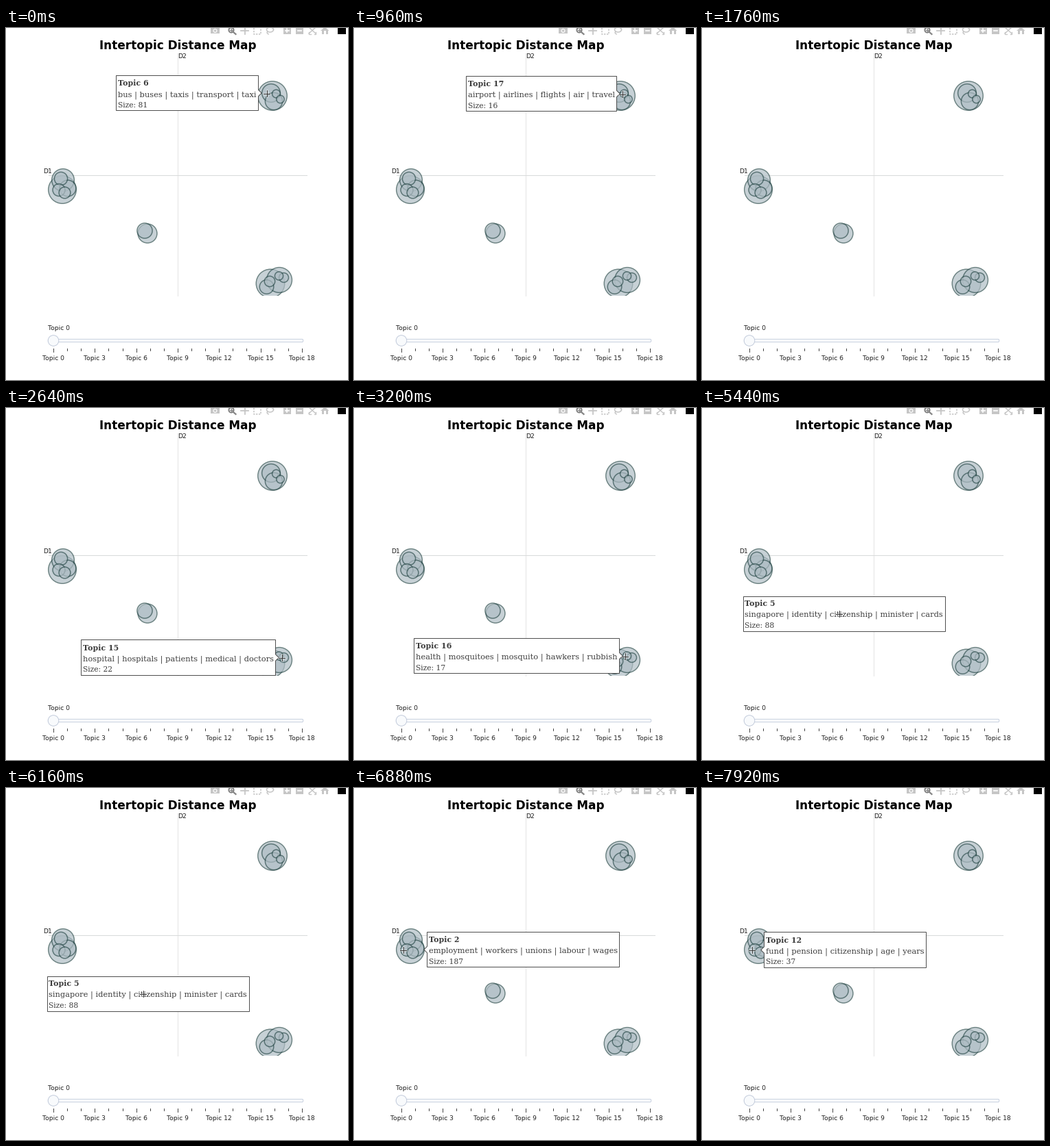
A matplotlib script for the animation above (8 s loop, 498 by 514 pixels).

```python
import matplotlib.pyplot as plt
import numpy as np
from matplotlib.animation import FuncAnimation
from matplotlib.patches import Circle, FancyBboxPatch, Polygon, Rectangle

W, H, DPI = 498, 514, 100
STEP, LOOP = 80, 8000
PT = 72 / DPI  # points per pixel
INK, LABEL = "#3c3c3c", "#1c1c1c"
ICON, ICON_ON = "#c6c6c6", "#858585"
SLIDER, SLIDER_EDGE = "#f8fafc", "#bec8d9"

# bubble centre and the topic's words, largest topic first
TOPICS = [
    (388, 99, ""),
    (385, 373, "housing | flats | tenants | buildings | estates"),
    (82, 236, "employment | workers | unions | labour | wages"),
    (398, 368, "schools | students | teachers | pupils | exam"),
    (83, 222, ""),
    (206, 300, "singapore | identity | citizenship | minister | cards"),
    (386, 95, "bus | buses | taxis | transport | taxi"),
    (390, 107, "road | traffic | vehicles | parking | cars"),
    (90, 234, ""),
    (202, 296, "language | languages | mandarin | english | chinese"),
    (379.5, 378, "culture | cultural | programmes | films | people"),
    (80, 220, ""),
    (77, 236.5, "fund | pension | citizenship | age | years"),
    (85.5, 240.5, ""),
    (384, 370, "university | students | graduates | degree | courses"),
    (404.5, 364.5, "hospital | hospitals | patients | medical | doctors"),
    (397.5, 362, "health | mosquitoes | mosquito | hawkers | rubbish"),
    (393.5, 96, "airport | airlines | flights | air | travel"),
    (399.5, 104, "ports | shipping | vessels | harbour | maritime"),
]
COUNT = len(TOPICS)
SIZES = np.interp(range(COUNT), [0, 2, 5, 6, 10, 12, 16, 18],
                  [205, 187, 88, 81, 48, 37, 17, 15]).astype(int)
CENTRES = np.array([(x, y) for x, y, _ in TOPICS])
RADII = 1.48 * np.sqrt(SIZES)

# (arrival in ms, topic) for each bubble the pointer visits
VISITS = [(0, 6), (320, 7), (960, 17), (1280, 18), (2080, 3), (2640, 15), (3040, 16),
          (3840, 14), (4240, 10), (4880, 1), (5280, 9), (5440, 5), (6400, 9),
          (6720, 2), (7520, 12)]

fig = plt.figure(figsize=(W / DPI, H / DPI), dpi=DPI, facecolor="white")
ax = fig.add_axes([0, 0, 1, 1])
ax.set(xlim=(0, W), ylim=(H, 0))
ax.axis("off")


def line(xs, ys, color, width=1.0, z=1, **kw):
    return ax.plot(xs, ys, color=color, lw=width * PT, zorder=z, **kw)[0]


def label(x, y, text, size=9.1, color=LABEL, z=3, **kw):
    kw.setdefault("family", "DejaVu Sans")
    return ax.text(x, y, text, fontsize=size * PT, color=color, zorder=z,
                   va="baseline", **kw)


def rect(x, y, w, h, color):
    return ax.add_patch(Rectangle((x, y), w, h, fc=color, lw=0))


def circle(x, y, r, fill="none", edge="none", width=0.0, **kw):
    return ax.add_patch(Circle((x, y), r, fc=fill, ec=edge, lw=width * PT, **kw))


def plus(x, y, arm, color, width):
    line([x - arm, x + arm], [y, y], color, width)
    line([x, x], [y - arm, y + arm], color, width)


def draw_toolbar():
    # camera
    rect(298, 0, 13, 8, ICON)
    circle(304.5, 4, 2.4, ICON, "white", 1.2)
    # zoom
    circle(328, 3, 3.6, edge=ICON_ON, width=2)
    line([330.5, 334.5], [5.5, 9], ICON_ON, 2.2)
    plus(328, 3, 1.8, ICON_ON, 1.2)
    # pan
    plus(347.8, 3.5, 5.5, ICON, 1.8)
    # box select and lasso
    line([361, 361, 371, 371], [0, 8.5, 8.5, 0], ICON, 1.6, ls=(0, (1.5, 1)))
    a = np.linspace(0, 2 * np.pi, 40)
    line(384.5 + 5 * np.cos(a), 2.5 + 3.5 * np.sin(a), ICON, 1.5)
    line([381, 380, 382], [5, 7, 9], ICON, 1.5)
    # zoom in and out
    for x in (404, 422):
        rect(x, 0, 10.5, 8.5, ICON)
        line([x + 2.5, x + 8], [3.5, 3.5], "white", 1.7)
    line([409.2, 409.2], [0.8, 6.2], "white", 1.7)
    # autoscale
    for side in (-1, 1):
        line([446 - 5 * side, 446 + 5 * side], [-1, 8], ICON, 1.4)
        line(446 + side * np.array([5, 5, 2.5]), [5.5, 8.5, 8.5], ICON, 1.3)
    # home
    ax.add_patch(Polygon([(458, 4), (464.3, -1.5), (470.5, 4)], fc=ICON, lw=0))
    for x in (460, 465.5):
        rect(x, 3.5, 3, 5, ICON)
    rect(483, 0, 12, 9, "black")


def draw_axes():
    label(250, 31, "Intertopic Distance Map", 16.85, "black", weight="bold", ha="center")
    line([249.5, 249.5], [37, 391], "#e4e4e4")
    line([62, 438], [214.5, 214.5], "#d8dada")
    label(250.3, 44, "D2")
    label(54.3, 212, "D1")


def draw_bubbles():
    area = Rectangle((0, 37), W, 353.5, transform=ax.transData)
    edge = 1.53
    for i, ((x, y), r) in enumerate(zip(CENTRES, RADII)):
        z = 2 + i / 100
        for patch in (circle(x, y, r - edge / 2, "#B0BEC5", alpha=0.7, zorder=z),
                      circle(x, y, r, edge="#2F4F4F", width=edge, alpha=0.7, zorder=z)):
            patch.set_clip_path(area)


def draw_slider():
    label(61.3, 441.3, "Topic 0")
    ax.add_patch(FancyBboxPatch((63, 456), 368, 1, boxstyle="round,pad=1.7",
                                fc=SLIDER, ec=SLIDER_EDGE, lw=0.8 * PT, zorder=3))
    circle(69, 456.5, 7.8, SLIDER, SLIDER_EDGE, 0.9, zorder=4)
    for i in range(COUNT):
        x, major = 69 + i * 20.1, i % 3 == 0
        line([x, x], [468, 473 if major else 471], "#333333", 0.9)
        if major:
            label(x, 485.3, f"Topic {i}", ha="center")


def pixel(v):
    return np.floor(v) + 0.5


class Tooltip:
    HALF, ARROW, PAD = 25.6, 4.7, 2.6

    def __init__(self):
        font = dict(family="DejaVu Serif", color=INK, z=11)
        self.box = ax.add_patch(Polygon([(0, 0), (1, 1), (2, 0)], fc="white", ec=INK,
                                        lw=0.9 * PT, zorder=10, joinstyle="miter"))
        self.head = label(0, 0, "", 11, weight="bold", **font)
        self.words = label(0, 0, "", 11.43, **font)
        self.size = label(0, 0, "", 10.8, **font)
        self.artists = [self.box, self.head, self.words, self.size]

    def show(self, topic, visible):
        for artist in self.artists:
            artist.set_visible(visible)
        x, y, words = TOPICS[topic]
        self.head.set_text(f"Topic {topic}")
        self.words.set_text(words)
        self.size.set_text(f"Size: {SIZES[topic]}")
        extent = self.words.get_window_extent()
        width = round(extent.width / fig.bbox.width * W + 2 * self.PAD)
        gap, a = RADII[topic] + self.ARROW, self.ARROW

        # beside the bubble where there is room, otherwise centred on it
        tip = None
        if x - gap - width > 0:
            left, tip = pixel(x - gap) - width, 1
        elif x + gap + width < 400:
            left, tip = pixel(x + gap), -1
        else:
            left = pixel(x - width / 2)
        right, top, bottom = left + width, pixel(y - self.HALF), pixel(y + self.HALF)
        corners = [(right, bottom), (left, bottom), (left, top), (right, top)]
        if tip == 1:
            corners += [(right, y - a), (right + a, y), (right, y + a)]
        elif tip == -1:
            corners[2:2] = [(left, y + a), (left - a, y), (left, y - a)]
        self.box.set_xy(corners)
        for text, dy in ((self.head, -11), (self.words, 5), (self.size, 20.7)):
            text.set_position((left + self.PAD, y + dy))


class Pointer:
    ARM = 4.8

    def __init__(self):
        self.arms = [(line([], [], "white", 2.6, 20, alpha=0.55),
                      line([], [], "#333333", 1, 21)) for _ in range(2)]
        self.artists = [artist for arm in self.arms for artist in arm]

    def show(self, position, visible):
        x, y = pixel(position)
        for artist in self.artists:
            artist.set_visible(visible)
        for across in self.arms[0]:
            across.set_data([x - self.ARM, x + self.ARM], [y, y])
        for down in self.arms[1]:
            down.set_data([x, x], [y - self.ARM, y + self.ARM])


def aim(topic):
    """The pointer rests a little left of a bubble's centre."""
    return CENTRES[topic] - (RADII[topic] / 2, 0)


def pointer_state(t):
    """Topic last reached, and the eased position on the way to the next one."""
    i = max(k for k, (arrival, _) in enumerate(VISITS) if arrival <= t)
    reached, topic = VISITS[i]
    start = aim(topic)
    if i + 1 == len(VISITS):
        return topic, start
    arrival, following = VISITS[i + 1]
    travel = aim(following) - start
    duration = min(arrival - reached, 120 + 1.2 * np.hypot(*travel))
    u = np.clip(1 - (arrival - t) / duration, 0, 1)
    return topic, start + travel * u * u * (3 - 2 * u)


draw_toolbar()
draw_axes()
draw_bubbles()
draw_slider()
tooltip, pointer = Tooltip(), Pointer()


def update(frame):
    topic, position = pointer_state(frame * STEP)
    near = np.hypot(*(position - CENTRES[topic])) < RADII[topic] + 12
    tooltip.show(topic, near)
    pointer.show(position, near)
    return tooltip.artists + pointer.artists


anim = FuncAnimation(fig, update, frames=LOOP // STEP, interval=STEP, repeat=True,
                     repeat_delay=0, blit=False)
plt.show()
```
